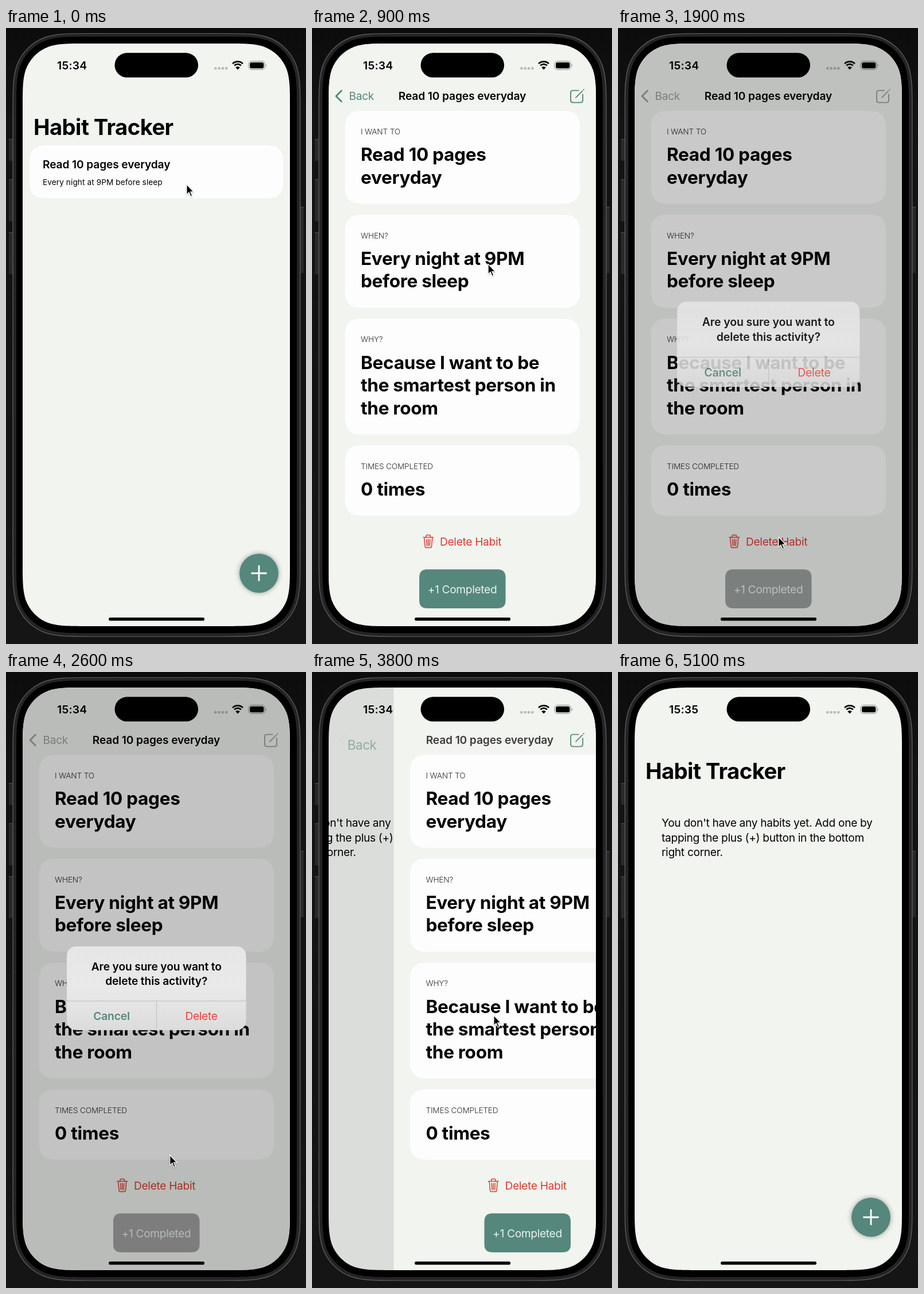
An HTML page that plays this animation: 523 by 1071 pixels, repeating every 5800 ms.

```html
<!DOCTYPE html>
<html lang="en">
<head>
<meta charset="utf-8">
<title>Habit Tracker</title>
<style>
  html, body { margin: 0; width: 100%; height: 100%; overflow: hidden; background: #111; }
  svg { display: block; width: 100%; height: 100%; }
  text { font-family: Inter, "Open Sans", sans-serif; font-optical-sizing: none; white-space: pre; }
  .large { font-size: 38.2px; font-weight: 700; letter-spacing: -.55px; }
  .big { font-size: 31.5px; font-weight: 700; letter-spacing: -.27px; }
  .body { font-size: 19.1px; letter-spacing: -.29px; }
  .head { font-size: 19.1px; font-weight: 600; letter-spacing: -.08px; }
  .caption { font-size: 13.6px; font-weight: 300; letter-spacing: -.15px; fill: #2c2c2c; }
  .small { font-size: 13.6px; letter-spacing: .1px; }
  .clock { font-size: 19.3px; font-weight: 600; letter-spacing: .25px; }
  .mid { text-anchor: middle; }
  .line { fill: none; stroke-linecap: round; stroke-linejoin: round; }
</style>
</head>
<body>
<svg id="stage" viewBox="0 0 523 1071" xmlns="http://www.w3.org/2000/svg"></svg>
<script>
const GREEN = '#55877c', RED = '#dc3a33', PAPER = '#f1f4ef', CARD = '#fdfdfd';
const LOOP = 5800, STEP = 100, WIDTH = 466;

// Rounded rectangle with continuous-curvature corners
function squircle(x, y, w, h, r, attrs) {
  const corner = [[1.5287, 0], [1.0885, 0], [.8684, 0], [.6315, .0749], [.3728, .1691],
                  [.1691, .3728], [.0749, .6315], [0, .8684], [0, 1.0885], [0, 1.5287]];
  const place = (flipX, flipY, reverse) => {
    const points = corner.map(([a, b]) =>
      `${flipX ? x + w - a * r : x + a * r} ${flipY ? y + h - b * r : y + b * r}`);
    if (reverse) points.reverse();
    return `${points[0]}C${points.slice(1).join(' ')}`;
  };
  const d = 'M' + [place(1, 0, 0), place(1, 1, 1), place(0, 1, 0), place(0, 0, 1)].join('L') + 'Z';
  return `<path d="${d}" ${attrs}/>`;
}
const rect = (x, y, w, h, r, attrs) =>
  `<rect x="${x}" y="${y}" width="${w}" height="${h}" rx="${r}" ${attrs}/>`;
const text = (x, y, style, content, attrs = '') =>
  `<text x="${x}" y="${y}" class="${style}" ${attrs}>${content}</text>`;
const line = (d, width, attrs = '') =>
  `<path class="line" d="${d}" stroke-width="${width}" ${attrs}/>`;

const sideButton = (x, y, h) =>
  rect(x, y, 9, h, 1.5, 'fill="#292929"') + rect(x, y, 9, 1.2, 0, 'fill="#4a4a4a"');

const detailCard = (y, h, label, lines) =>
  squircle(57.5, y, 409.5, h, 24, `fill="${CARD}"`) +
  text(85, y + 41, 'caption', label) +
  lines.map((s, i) => text(85, y + 87.3 + i * 39.6, 'big', s)).join('');

const wifiArc = r => {
  const k = r * Math.SQRT1_2;
  return line(`M${404 - k} ${71 - k}A${r} ${r} 0 0 1 ${404 + k} ${71 - k}`, 2.7,
    'stroke="#000" style="stroke-linecap:butt"');
};

const frame = sideButton(5, 193, 38) + sideButton(5, 263, 73) + sideButton(5, 355, 73) +
  sideButton(510, 311, 115) +
  squircle(12, 9.5, 501, 1048.5, 89, 'fill="#242424" stroke="#626262" stroke-width="1.2"') +
  squircle(18, 15, 489, 1037, 83, 'fill="#000"');

const home = `
  <g id="home">
    <g id="habitRow">
      ${squircle(41, 204, 442.5, 92, 24, `fill="${CARD}"`)}
      ${text(64, 243.5, 'head', 'Read 10 pages everyday')}
      ${text(64, 272.5, 'small', 'Every night at 9PM before sleep')}
    </g>
    <g id="emptyNote">
      ${["You don't have any habits yet. Add one by", 'tapping the plus (+) button in the bottom', 'right corner.']
        .map((s, i) => text(76, 269 + i * 25.5, 'body', s)).join('')}
    </g>
    <circle cx="441" cy="948" r="34" fill="${GREEN}" filter="url(#glow)"/>
    ${line('M428.5 948H453.5M441 935.5V960.5', 2.8, 'stroke="#fff"')}
  </g>
  <rect id="homeShade" x="29" y="27" width="466" height="1013"/>`;

const trash = line('M194 885.5H211.5M199 885V883.5Q199 881.5 201 881.5H204.5Q206.5 881.5 206.5 883.5V885' +
  'M195.7 886L197 901Q197.2 903.5 199.5 903.5H206Q208.3 903.5 208.5 901L209.8 886' +
  'M199.8 889L200.3 900M202.75 889V900M205.7 889L205.2 900', 1.5, `stroke="${RED}"`);

const detail = `
  <g id="detail">
    ${rect(29, 27, WIDTH + 2, 1013, 0, `fill="${PAPER}"`)}
    ${detailCard(144, 161.5, 'I WANT TO', ['Read 10 pages', 'everyday'])}
    ${detailCard(324.5, 162, 'WHEN?', ['Every night at 9PM', 'before sleep'])}
    ${detailCard(505.2, 201.5, 'WHY?', ['Because I want to be', 'the smartest person in', 'the room'])}
    ${detailCard(725.5, 122.5, 'TIMES COMPLETED', ['0 times'])}
    ${trash}
    ${text(223, 900, 'body', 'Delete Habit', `fill="${RED}"`)}
    <g id="completeButton">${squircle(187, 941.3, 150.5, 67.7, 12, '')}</g>
    ${text(262, 982.7, 'body mid', '+1 Completed', 'fill="#eaf2ef"')}
  </g>`;

const navigation = `
  <g id="largeTitle">${text(0, 0, 'large', 'Habit Tracker')}</g>
  <g id="backLabel">${text(0, 0, 'body', 'Back')}</g>
  <g id="chevron">${line('M51.3 109L42 118.4L51.3 127.8', 2.9)}</g>
  <g id="navTitle">${text(262, 125, 'head mid', 'Read 10 pages everyday')}</g>
  <g id="editIcon">
    ${line('M464.5 108.6H455Q451 108.6 451 112.6V125.6Q451 129.6 455 129.6H468Q472 129.6 472 125.6V115.5' +
      'M460 120.8L471.2 109.6M473.2 107.6L473.8 107', 1.9)}
  </g>`;

const alertBox = `
  <rect id="alertShade" x="29" y="27" width="466" height="1013"/>
  <g id="alert">
    ${squircle(106, 477, 312.5, 145.7, 16, 'fill="url(#alertFill)"')}
    ${text(262.3, 518.8, 'head mid', 'Are you sure you want to')}
    ${text(262.3, 544.3, 'head mid', 'delete this activity?')}
    <path d="M106 572H418.5M262.5 572V622.5" stroke="#bdbdbd"/>
    ${text(184, 605, 'head mid', 'Cancel', `fill="${GREEN}"`)}
    ${text(340.5, 605, 'body mid', 'Delete', 'fill="#e8443b"')}
  </g>`;

const statusBar = `
  <text id="clock" x="89" y="72" class="clock"></text>
  ${rect(189.5, 43.3, 145.5, 42.7, 21.3, '')}
  ${[363.2, 369.5, 375.8, 382.1].map(x => rect(x, 68, 4.2, 4.2, 1, 'fill="#000" opacity=".24"')).join('')}
  ${wifiArc(12.6)}${wifiArc(8.2)}
  <path d="M404 72.4L400.2 68.5A5.4 5.4 0 0 1 407.8 68.5Z"/>
  ${rect(422.9, 57.7, 28.6, 14.6, 4.8, 'fill="none" stroke="#888"')}
  ${rect(425, 59.8, 24.4, 10.4, 3, '')}
  <path d="M453 62.7Q455 65 453 67.3Z" fill="#888"/>
  ${rect(179, 1024.9, 167, 5.6, 2.8, '')}`;

document.getElementById('stage').innerHTML = `
  <defs>
    <clipPath id="screen">${squircle(29, 27, WIDTH, 1013, 72, '')}</clipPath>
    <linearGradient id="backdrop" x2="0" y2="1">
      <stop stop-color="#0c0c0c"/><stop offset=".15" stop-color="#131313"/><stop offset="1" stop-color="#151515"/>
    </linearGradient>
    <linearGradient id="alertFill" x2="0" y2="1">
      <stop stop-color="#e6e6e6"/><stop offset=".5" stop-color="#e9e9e9"/><stop offset="1" stop-color="#dcdcdc"/>
    </linearGradient>
    <filter id="glow" x="-30%" y="-30%" width="160%" height="160%">
      <feDropShadow dx="0" dy="0" stdDeviation="4.5" flood-opacity=".38"/>
    </filter>
    <filter id="cursorShadow" x="-50%" y="-50%" width="200%" height="200%">
      <feDropShadow dx="0" dy="1" stdDeviation="1" flood-opacity=".35"/>
    </filter>
  </defs>
  <rect width="523" height="1071" fill="url(#backdrop)"/>
  ${frame}
  <g clip-path="url(#screen)">
    ${rect(29, 27, WIDTH, 1013, 0, `fill="${PAPER}"`)}
    ${home}${detail}${navigation}${statusBar}${alertBox}
  </g>
  <path id="cursor" d="M0 0V17.6L4 13.8L7 20.8L9.6 19.7L6.6 12.8H12Z" stroke="#fff" stroke-width="1.1"
    filter="url(#cursorShadow)"/>`;

const parts = Object.fromEntries([...document.querySelectorAll('#stage [id]')].map(el => [el.id, el]));
const clamp = v => Math.min(1, Math.max(0, v));
const mix = (a, b, k) => a + (b - a) * k;
const tint = gray => `color-mix(in srgb, #a2a2a2 ${gray * 100}%, ${GREEN})`;
const show = (el, visible) => el.style.display = visible ? '' : 'none';
const move = (el, x, y, scale = 1) => el.setAttribute('transform', `translate(${x} ${y}) scale(${scale})`);

// Distance still to go for a critically damped spring released at start
function remaining(t, start, speed) {
  const x = Math.max(0, t - start) / 1000 * speed;
  return (1 + x) * Math.exp(-x);
}

const cursorMoves = [
  { start: 700, end: 1350, from: [315, 272], to: [280, 885] },
  { start: 2450, end: 3050, from: [280, 885], to: [317, 597] },
  { start: 4750, end: 5080, from: [317, 597], to: [530, 330] },
];
function cursorAt(t) {
  const m = cursorMoves.findLast(c => t >= c.start) || cursorMoves[0];
  const k = clamp((t - m.start) / (m.end - m.start));
  const eased = k * k * (3 - 2 * k);
  return m.from.map((v, i) => mix(v, m.to[i], eased));
}

function drawPages(t) {
  const deleted = t > 2500;
  const away = deleted ? 1 - remaining(t, 3749, 18.5) : remaining(t, 0, 18.5);
  show(parts.habitRow, !deleted);
  show(parts.emptyNote, deleted);
  move(parts.home, -.3 * WIDTH * (1 - away), 0);
  parts.homeShade.style.opacity = .1 * (1 - away * away);
  move(parts.detail, WIDTH * away, 0);

  const grow = away ** 1.25;
  move(parts.largeTitle, mix(64.5, 48, grow), mix(125, 186, grow), mix(.5, 1, grow));
  parts.largeTitle.style.opacity = clamp((away - .3) / .7);
  move(parts.backLabel, mix(64.5, 48, grow), mix(125, 186, grow), mix(1, 2, grow));
  parts.backLabel.style.opacity = clamp(1 - away * 1.8);
  move(parts.chevron, 30 * away, 0);
  parts.chevron.style.opacity = clamp(1 - away * 4);
  move(parts.navTitle, .6 * WIDTH * grow, 0);
  parts.navTitle.style.opacity = 1 - away;
  parts.editIcon.style.opacity = 1 - away * away;
}

function drawAlert(t) {
  const opening = t < 3250;
  const amount = opening ? 1 - remaining(t, 1740, 25) : remaining(t, 3300, 25);
  const scale = opening ? 1 + .2 * (1 - amount) : 1;
  move(parts.alert, 262.3 * (1 - scale), 549.8 * (1 - scale), scale);
  parts.alert.style.opacity = clamp(1 - 1.6 * (1 - amount));
  parts.alertShade.style.opacity = .23 * amount;
  parts.backLabel.style.fill = parts.chevron.style.stroke = parts.editIcon.style.stroke = tint(amount);
  parts.completeButton.style.fill = tint(opening ? amount : remaining(t, 3230, 25));
}

function draw(now) {
  const t = Math.floor(now % LOOP / STEP) * STEP;
  drawPages(t);
  drawAlert(t);
  parts.clock.textContent = t < 4300 ? '15:34' : '15:35';
  move(parts.cursor, ...cursorAt(t));
  show(parts.cursor, t < 5100);
}

const began = performance.now();
function tick() {
  draw(performance.now() - began);
  requestAnimationFrame(tick);
}
tick();
</script>
</body>
</html>
```
